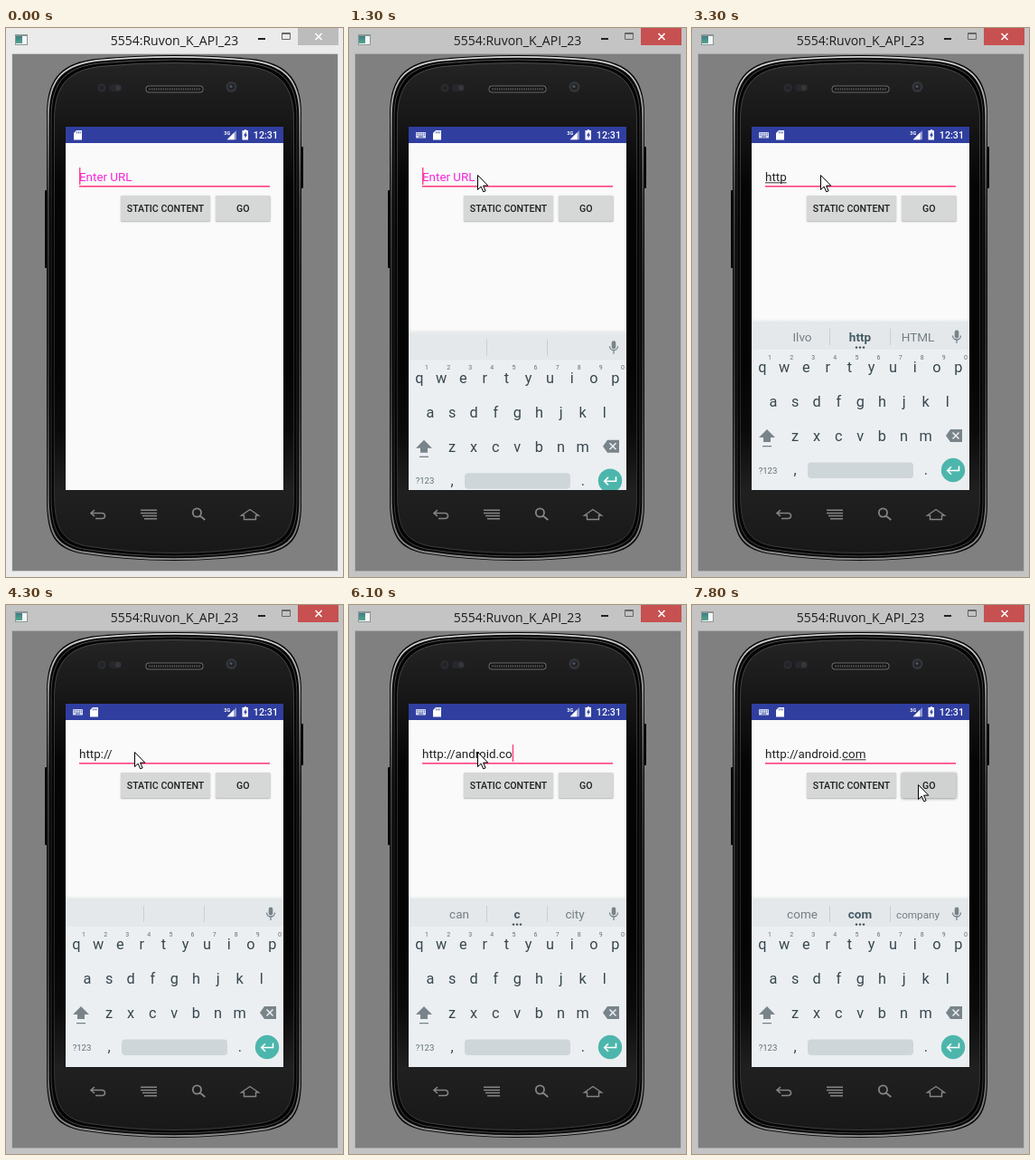
Animation, 373 px wide and 606 px high, one loop 8000 ms. Source, as an HTML page with a canvas:

```html
<!DOCTYPE html>
<html lang="en">
<head>
<meta charset="utf-8">
<title>Emulator demo</title>
<style>
html, body { margin: 0; width: 100%; height: 100%; overflow: hidden; background: #c4c4c4; }
canvas { display: block; width: 373px; height: 606px; }
</style>
</head>
<body>
<canvas></canvas>
<script>
const LOOP = 8000, STEP = 100, BLINK = 450;
const canvas = document.querySelector('canvas');
const c = canvas.getContext('2d');
const dpr = window.devicePixelRatio || 1;
canvas.width = 373 * dpr;
canvas.height = 606 * dpr;

// time, text, start of the underlined word (-1: none), suggestions
const SITE = 'http://';
const states = [
  [-400, '', -1, ''],
  [900, '', -1, ''],
  [1100, '', -1, ''],
  [2000, 'h', -1, ''],
  [2200, 'h', 0, 'hi h he'],
  [2300, 'ht', -1, 'hi h he'],
  [2400, 'ht', 0, 'he ht hit'],
  [2500, 'htt', -1, 'he ht hit'],
  [2700, 'http', -1, 'he ht hit'],
  [2800, 'http', 0, 'Ilvo http HTML'],
  [3400, 'http:', -1, 'Ilvo http HTML'],
  [3700, 'http:/', -1, ''],
  [3850, SITE, -1, ''],
  [4500, SITE + 'a', -1, ''],
  [4600, SITE + 'a', 7, 'as a and'],
  [4700, SITE + 'an', -1, 'as a and'],
  [4800, SITE + 'an', 7, 'any an and'],
  [4900, SITE + 'and', -1, 'any an and'],
  [5000, SITE + 'and', 7, 'band and land'],
  [5100, SITE + 'andr', -1, 'band and land'],
  [5200, SITE + 'andr', 7, 'under andr and'],
  [5300, SITE + 'andro', -1, 'under andr and'],
  [5400, SITE + 'andro', 7, 'android andro androids'],
  [5500, SITE + 'androi', -1, 'android andro androids'],
  [5600, SITE + 'android', -1, 'android andro androids'],
  [5700, SITE + 'android', 7, 'Android android androids'],
  [5900, SITE + 'android.', -1, ''],
  [6000, SITE + 'android.c', 15, 'can c city'],
  [6100, SITE + 'android.co', -1, 'can c city'],
  [6200, SITE + 'android.co', 15, 'come co cook'],
  [6300, SITE + 'android.com', -1, 'come co cook'],
  [6400, SITE + 'android.com', 15, 'come com company']
];

function rect(x, y, w, h, color) {
  c.fillStyle = color;
  c.fillRect(x, y, w, h);
}
function round(x, y, w, h, r, color) {
  c.beginPath();
  c.roundRect(x, y, w, h, r);
  c.fillStyle = color;
  c.fill();
}
function disc(x, y, r, color) {
  c.beginPath();
  c.arc(x, y, r, 0, 7);
  c.fillStyle = color;
  c.fill();
}
function fill(d, color) {
  c.fillStyle = color;
  c.fill(new Path2D(d));
}
function line(d, color, width = 1) {
  c.strokeStyle = color;
  c.lineWidth = width;
  c.stroke(new Path2D(d));
}
function text(s, x, y, size, color, align = 'center', weight = 400, font = 'Roboto') {
  c.font = `${weight} ${size}px ${font}, sans-serif`;
  c.textAlign = align;
  c.fillStyle = color;
  c.fillText(s, x, y);
}
function fade(y0, y1, ...colors) {
  const g = c.createLinearGradient(0, y0, 0, y1);
  colors.forEach((k, i) => g.addColorStop(i / (colors.length - 1), k));
  return g;
}

function drawWindow(active) {
  rect(0, 0, 373, 606, active ? '#c4c4c4' : '#ebebeb');
  rect(6.5, 28, 361, 572, active ? '#aaa' : '#c9c9c9');
  rect(7, 29, 360, 570, '#808080');
  rect(10, 7, 14, 12, '#8c9696');
  rect(11, 9, 12, 9, '#f7f7f7');
  rect(11, 9, 7, 8, fade(9, 17, '#3c7f86', '#56a58c'));
  text('5554:Ruvon_K_API_23', 186.5, 19, 14, '#1c1c1c', 'center', 400, '"Open Sans"');
  rect(279, 11, 8, 2, '#222');
  line('M305.5 5.5h9v7h-9zM305 6.5h10', '#666');
  rect(323, 0, 45, 19, active ? '#c75050' : '#bcbcbc');
  line('M342.5 6l7 7M349.5 6l-7 7', '#fff', 1.6);
}

const bodyPath = new Path2D('M45 95C45 51 66 38 100 34Q186 26 272 34C306 38 327 52 327 95V528' +
  'C326 560 318 574 290 580Q186 596 82 580C54 574 46 560 45 525Z');
function body(inset) {
  const sx = 1 - inset / 141, sy = 1 - inset / 279;
  const p = new Path2D();
  p.addPath(bodyPath, new DOMMatrix([sx, 0, 0, sy, 186 * (1 - sx), 309 * (1 - sy)]));
  return p;
}
function ring(inset, width, color) {
  c.strokeStyle = color;
  c.lineWidth = width;
  c.stroke(body(inset));
}

function drawPhone() {
  round(43, 179, 4, 86, 1, '#080808');
  round(325, 131, 4, 46, 1, '#080808');
  c.fillStyle = '#050505';
  c.fill(body(0));
  ring(1.8, 1.8, fade(30, 588, '#d8d8d8', '#8a8a8a', '#444', '#333', '#333', '#444', '#666', '#8e8e8e'));
  ring(5, 1, fade(30, 588, '#555', '#222', '#222', '#4a4a4a'));
  c.fillStyle = fade(38, 580, '#242424', '#161616', '#050505', '#040404', '#040404', '#040404', '#0a0a0a', '#202020', '#181818');
  c.fill(body(8.5));
  ring(8.5, 1, fade(38, 580, '#4a4a4a', '#2a2a2a', '#262626', '#3c3c3c'));

  round(154.5, 63.5, 64, 8, 4, '#6a6a6a');
  round(155.5, 64.5, 62, 6, 3, '#111');
  for (let x = 158; x < 216; x += 2) rect(x, 66, 1, 3, '#555');
  disc(106, 66, 4.5, '#2b2d30');
  disc(106, 66, 2.5, '#202328');
  round(114, 62, 14, 8, 4, '#26282b');
  disc(124, 66, 3, '#34373b');
  disc(249.5, 65, 6, '#34363a');
  disc(249.5, 65, 3.6, '#202328');
  disc(249, 64.5, 1.6, '#4b535c');

  const g = '#858585';
  line('M98 532l-4 3.5 4 3.5M94 535.5h12q3.5 0 3.5 3t-3.5 3h-7', g, 1.6);
  line('M149 532.2h18M149 535.4h18M151 538.6h16M153 541.8h14', g, 1.5);
  line('M216 535a4.6 4.6 0 1 1-9.2 0a4.6 4.6 0 1 1 9.2 0M214.8 538.5l5.5 4.5', g, 1.8);
  line('M260.5 538l9.5-6.5 9.5 6.5h-3v4.5h-13v-4.5z', g, 1.4);
}

function sdIcon(x) {
  fill(`M${x + 3} 113h6v10.5h-9v-7.5z`, '#fff');
  for (let i = 0; i < 3; i++) rect(x + 3.2 + i * 1.8, 114.2, 0.8, 2.2, '#303f9f');
}

function drawStatus(t) {
  rect(66, 109, 241, 18, '#303f9f');
  const typing = t >= 1100;
  if (typing) {
    round(74, 115, 11, 6.5, 0.6, '#d5d9ee');
    for (let i = 0; i < 5; i++) {
      rect(75.1 + i * 2, 116.2, 0.9, 0.9, '#303f9f');
      rect(75.1 + i * 2, 117.8, 0.9, 0.9, '#303f9f');
    }
    rect(77, 119.6, 5, 0.9, '#303f9f');
  }
  sdIcon(typing ? 93 : 75);
  text('3G', 244.8, 117.5, 5.5, '#fff', 'center', 700);
  fill('M255 113v10.3h-10.3z', '#8f98cc');
  const s = t < 4100 ? 8 : 7.5;
  fill(`M${244.7 + s} 123.3h${-s}l${s} ${-s}z`, '#fff');
  fill('M263 113h1v-1h2v1h2v10.5h-6.5v-10.5z', '#fff');
  fill('M265.6 114.5l-2.6 4.2h1.5v3l2.6-4.3h-1.5z', '#303f9f');
  text('12:31', 301, 122, 10.7, '#fff', 'right', 500);
}

function button(label, x, w, pressed) {
  c.save();
  c.shadowColor = pressed ? '#0007' : '#0005';
  c.shadowBlur = (pressed ? 3 : 1.5) * dpr;
  c.shadowOffsetY = dpr * 0.7;
  round(x, 185, w, 28, 1.2, pressed ? '#d0d1d1' : '#d6d7d7');
  c.restore();
  text(label, x + w / 2, 203, 10.6, '#1e1e1e', 'center', 500);
}

function drawForm(t, [since, value, under]) {
  const x = 81, size = 13.4;
  text(value || 'Enter URL', x, 169, size, value ? '#212121' : '#f626d8', 'left');
  const width = s => c.measureText(s).width;
  const end = x + width(value);
  if (under >= 0) {
    const from = x + width(value.slice(0, under));
    rect(from, 170.3, end - from, 1, '#333');
  }
  if (Math.floor((t - since) / BLINK) % 2 === 0) rect(end, 154, 1.4, 19, '#ff4081');
  rect(x, 174, 211, 1.6, '#ff4081');
  button('STATIC CONTENT', 127, 99, false);
  button('GO', 232, 60.5, t >= 7800);
}

function keyRow(keys, x, y) {
  [...keys].forEach((k, i) => text(k, x + i * 24.1, y, 16.3, '#37474f'));
}

function drawSuggestions(words) {
  [152.5, 219.5].forEach(x => rect(x - 0.5, 332, 1, 18, '#c8cfd3'));
  if (!words) return;
  words.split(' ').forEach((word, i) => {
    const mid = i === 1, weight = mid ? 700 : 400;
    c.font = `${weight} 13.5px Roboto, sans-serif`;
    const size = 13.5 * Math.min(1, 48 / c.measureText(word).width);
    text(word, 122 + i * 64, 346, size, mid ? '#455a64' : '#737d83', 'center', weight);
  });
  [182, 186, 190].forEach(x => disc(x, 352.6, 1.2, '#37474f'));
}

function drawKeyboard(t, words) {
  if (t < 1100) return;
  const p = Math.min(1, (t - 1000) / 400);
  c.save();
  c.beginPath();
  c.rect(66, 127, 241, 383);
  c.clip();
  c.translate(0, 187 * (1 - p) ** 2);
  rect(66, 321, 241, 5, fade(321, 326, '#fafafa', '#dfe4e6'));
  rect(66, 326, 241, 29, '#e4e8ea');
  rect(66, 355, 241, 155, '#eceff1');
  drawSuggestions(words);

  const grey = '#78848a';
  round(290.7, 333.5, 4.6, 9, 2.3, grey);
  line('M288.5 339.5a4.5 4.5 0 0 0 9 0M293 344v4', grey, 1.3);

  keyRow('qwertyuiop', 78, 380);
  [...'1234567890'].forEach((k, i) => text(k, 86 + i * 24.1, 365.5, 7, '#607078'));
  keyRow('asdfghjkl', 90, 418);
  keyRow('zxcvbnm', 114, 456);
  fill('M83 443l9 9h-5v5h-8v-5h-5z', grey);
  rect(78, 461, 10, 1.3, grey);
  fill('M281 450l5-7h13v14h-13z', grey);
  line('M288.5 446.5l7 7M295.5 446.5l-7 7', '#eceff1', 1.5);

  text('?123', 84, 491.5, 9.6, '#60717a');
  keyRow(',', 114, 493);
  round(128, 479.5, 117, 17.5, 4, '#cfd6da');
  keyRow('.', 259, 493);
  disc(289, 488, 13.2, '#4db6ac');
  line('M295.5 483.5v5h-12.5M287 484.2l-4.3 4.3 4.3 4.3', '#fff', 1.6);
  c.restore();
}

function drawPointer(t) {
  if (t < 100) return;
  let x = 142, y = 162;
  if (t < 600) {
    const u = (t - 100) / 500, e = (1 - u) ** 2 * (1 + 2 * u);
    x += 190 * e;
    y -= 107 * e;
  } else if (t >= 7100) {
    const u = Math.min(1, (t - 7000) / 600), e = u * u * (3 - 2 * u);
    x += 108 * e;
    y += 36 * e;
  }
  c.save();
  c.translate(Math.round(x) + 0.5, Math.round(y) + 0.5);
  const arrow = 'M0 0V16L3.7 12.6 6.2 18.3 8.6 17.3 6.1 11.6H11.3Z';
  fill(arrow, '#fff');
  line(arrow, '#000');
  c.restore();
}

function draw(now) {
  const t = Math.floor(now % LOOP / STEP) * STEP;
  const state = states.findLast(s => s[0] <= t);
  c.setTransform(dpr, 0, 0, dpr, 0, 0);
  drawWindow(t >= 900);
  drawPhone();
  rect(66, 109, 241, 401, '#fafafa');
  drawStatus(t);
  drawForm(t, state);
  drawKeyboard(t, state[3]);
  drawPointer(t);
}

const start = performance.now();
function tick() {
  draw(performance.now() - start);
  requestAnimationFrame(tick);
}
tick();
</script>
</body>
</html>
```
